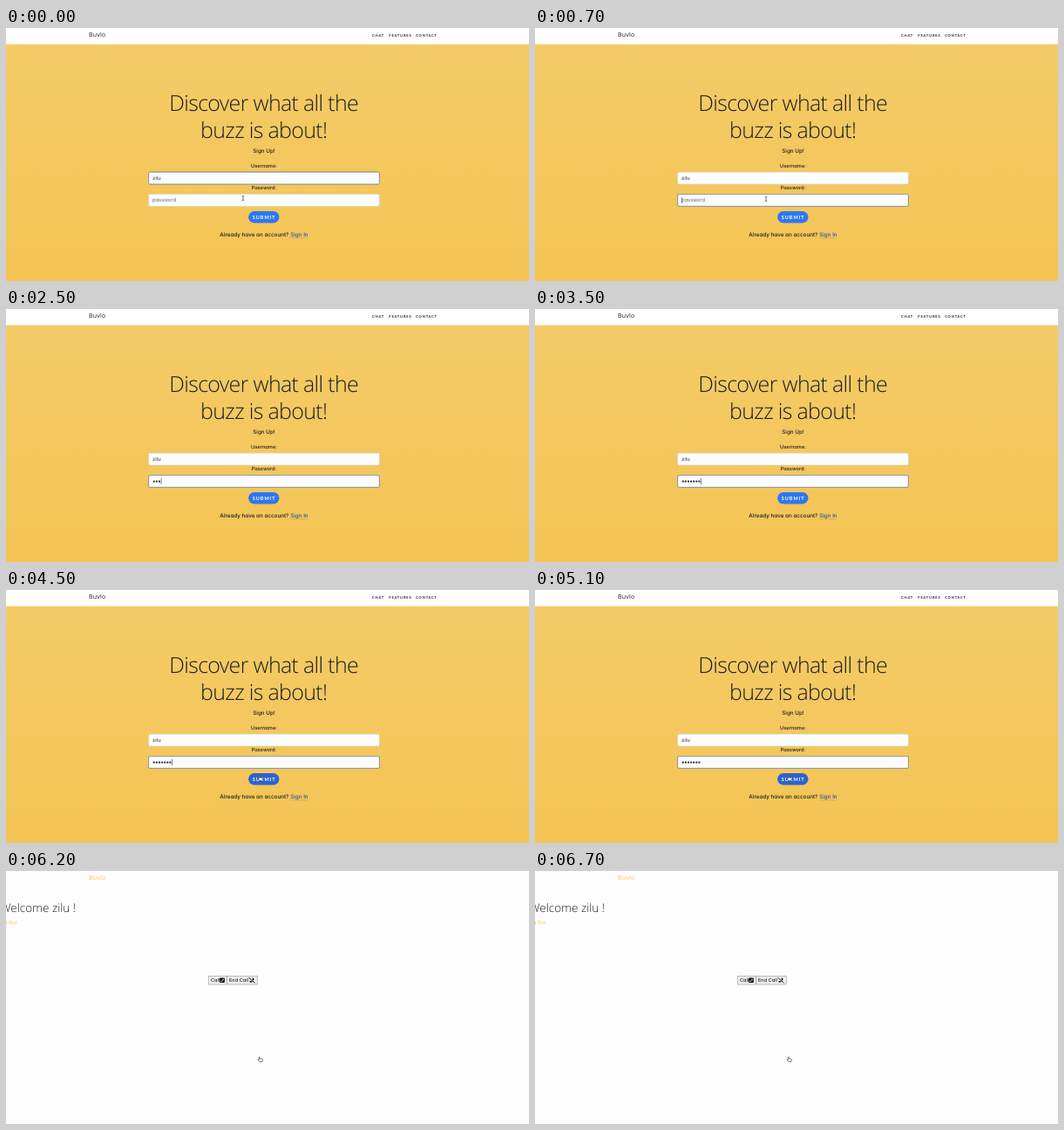
These frames come from a looping animation (600x290 px, 8000 ms). An HTML page:

```html
<!DOCTYPE html>
<html lang="en">
<head>
<meta charset="utf-8">
<title>Sign up</title>
<style>
  html, body { margin: 0; width: 100%; height: 100%; overflow: hidden; background: #fff; }
  svg { display: block; width: 100vw; height: 100vh; }
  text { font: 500 6.3px Inter, sans-serif; font-feature-settings: "cv11"; fill: #1b1e22; text-rendering: geometricPrecision; }
  .mid { text-anchor: middle; }
  .end { text-anchor: end; }
  .title { font: 300 25px "Open Sans", sans-serif; letter-spacing: -.68px; }
  .brand { font: 400 7px "Open Sans", sans-serif; letter-spacing: .25px; }
  .nav { font: 700 4.1px Lato, sans-serif; letter-spacing: .78px; }
  .label { font-size: 5.7px; }
  .hint { font-weight: 400; font-size: 5.8px; fill: #5f676f; }
  .value { font-size: 5.8px; fill: #495057; }
  .cta { font: 700 5.6px Lato, sans-serif; letter-spacing: .95px; fill: #fff; }
  .link { fill: #2a4fb4; }
  .hello { font: 300 13.5px "Open Sans", sans-serif; }
  .gold { fill: #f2c75f; }
  .small { font-weight: 400; font-size: 5.6px; }
  .tool { fill: #000; }
  .field { fill: #fcfdff; stroke: #ced4da; stroke-width: .5; }
  .focus { stroke: #8d949e; stroke-width: .8; filter: drop-shadow(0 0 .7px #5a6a8a); }
  .key { fill: #efefef; stroke: #858585; stroke-width: .5; }
</style>
</head>
<body>
<svg viewBox="0 0 600 290" preserveAspectRatio="none">
  <defs>
    <linearGradient id="honey" x1="0" y1="0" x2="0" y2="1">
      <stop offset="0" stop-color="#f4cb67"/>
      <stop offset="1" stop-color="#f4c454"/>
    </linearGradient>
    <path id="handset" d="M-2.1-1.7l1.1-.5 .6 1.3-.6.5q.4.9 1.3 1.3l.5-.6 1.3.6-.5 1.1q-3.4 0-3.7-3.7z"/>
  </defs>

  <g id="form">
    <rect width="600" height="290" fill="#fff"/>
    <rect y="18.6" width="600" height="271.4" fill="url(#honey)"/>
    <text class="brand" x="95" y="10.2">Buvlo</text>
    <text class="nav" x="420" y="9.8">CHAT</text>
    <text class="nav" x="439.3" y="9.8">FEATURES</text>
    <text class="nav" x="470.2" y="9.8">CONTACT</text>
    <text class="title mid" x="295.7" y="95.2">Discover what all the</text>
    <text class="title mid" x="295.7" y="125.6">buzz is about!</text>
    <text class="mid" x="296" y="143.3">Sign Up!</text>
    <text class="label mid" x="296" y="159.5">Username:</text>
    <rect id="user" class="field" x="163.7" y="165.2" width="264.6" height="13.7" rx="1.6"/>
    <text class="value" x="168" y="174.1">zilu</text>
    <text class="label mid" x="296" y="185.1">Password:</text>
    <rect id="pass" class="field" x="163.7" y="190.6" width="264.6" height="13.7" rx="1.6"/>
    <text id="hint" class="hint" x="168" y="199.3">password</text>
    <g id="dots" fill="#30353b"></g>
    <rect id="caret" y="194" width=".6" height="7" fill="#30353b"/>
    <rect id="ring" x="277.5" y="209.2" width="36.8" height="15" rx="7.5" fill="#9aabc4"/>
    <rect id="button" x="278.1" y="209.9" width="35.4" height="13.6" rx="6.8"/>
    <text class="cta mid" x="296.1" y="218.7">SUBMIT</text>
    <text class="mid" x="296" y="239.4">Already have an account? <tspan class="link">Sign In</tspan></text>
    <path d="M325.5 240.8h20.5" stroke="#2a4fb4" stroke-width=".5" opacity=".35"/>
  </g>

  <g id="home">
    <rect width="600" height="290" fill="#fefdfe"/>
    <text class="brand gold" x="95" y="10.2">Buvlo</text>
    <text class="hello end" x="80" y="47.2">Welcome zilu !</text>
    <text class="small gold end" x="12.5" y="61.3">Log Out</text>
    <rect class="key" x="232.7" y="120.4" width="20.8" height="9.6"/>
    <rect class="key" x="253.6" y="120.4" width="34.6" height="9.6"/>
    <text class="small tool" x="235" y="127.2">Call</text>
    <text class="small tool" x="256" y="127.2">End Call</text>
    <rect x="245.2" y="122.4" width="5.6" height="5.6" rx=".8"/>
    <use href="#handset" fill="#fff" transform="translate(248 125.2) rotate(-90) scale(.85)"/>
    <use href="#handset" transform="translate(282 125.2) rotate(-90) scale(1.25)"/>
    <path d="M278.4 122.2l7.2 6" stroke="#efefef" stroke-width="1.6"/>
    <path d="M278.4 122.2l7.2 6" stroke="#000" stroke-width=".9"/>
  </g>

  <g id="cursor">
    <path id="beam" d="M-1.3-2.6q1.3 0 1.3.7 0-.7 1.3-.7M0-2V2M-1.3 2.6q1.3 0 1.3-.7 0 .7 1.3.7" fill="none" stroke="#333" stroke-width=".65"/>
    <path id="arrow" d="M0-2.5v5.8l1.4-1.3.9 2 .9-.4-.9-1.9h1.9z" fill="#111" stroke="#fff" stroke-width=".4"/>
    <path id="hand" d="M-1.2-2.6q.6-.5 1 .2l.4 1.5 2.2.4q.7.3.5 1.2l-.5 1.9H-.6L-2.3.6q-.3-.8.5-.7l.8.4z" fill="#fff" stroke="#222" stroke-width=".6" stroke-linejoin="round"/>
  </g>
</svg>
<script>
const LOOP = 8000, STEP = 100;
const FOCUS = 500, SUBMIT = 5900, HOME = 6200;
const KEYS = [2000, 2200, 2500, 2700, 2900, 3200, 3500];
const HIDE = 1900, SHOW = 4000;
const PATH = [[0, 272, 195], [100, 272, 195], [500, 265, 196], [4000, 265, 196], [4400, 291.5, 216], [LOOP, 291.5, 216]];
const DOT = 3.1;

const $ = id => document.getElementById(id);
const show = (id, on) => $(id).setAttribute("display", on ? "inline" : "none");

const dots = KEYS.map((_, i) => {
  const c = document.createElementNS("http://www.w3.org/2000/svg", "circle");
  c.setAttribute("cx", 169.8 + i * DOT);
  c.setAttribute("cy", 197.7);
  c.setAttribute("r", 1.15);
  return $("dots").appendChild(c);
});

function pointer(t) {
  const i = PATH.findIndex(p => p[0] > t);
  const [t0, x0, y0] = PATH[i - 1], [t1, x1, y1] = PATH[i];
  const k = (t - t0) / (t1 - t0), e = k * k * (3 - 2 * k);
  return [x0 + (x1 - x0) * e, y0 + (y1 - y0) * e];
}

function draw(t) {
  const home = t >= HOME, typing = t >= FOCUS && t < SUBMIT;
  show("form", !home);
  show("home", home);

  const typed = KEYS.filter(k => k <= t).length;
  dots.forEach((d, i) => d.setAttribute("display", i < typed ? "inline" : "none"));
  show("hint", !typed);
  $("user").classList.toggle("focus", t < FOCUS);
  $("pass").classList.toggle("focus", typing);

  const since = t - (typed ? KEYS[typed - 1] : FOCUS);
  show("caret", typing && Math.floor(since / 500) % 2 === 0);
  $("caret").setAttribute("x", typed ? 168.5 + typed * DOT : 168.2);

  const [x, y] = pointer(t);
  const over = y > 210;
  $("button").setAttribute("fill", over ? "#2a64d0" : "#2f76f4");
  show("ring", t >= SUBMIT);
  $("cursor").setAttribute("transform", `translate(${x} ${y})`);
  show("cursor", t < HIDE || t >= SHOW);
  show("beam", y < 204.5);
  show("arrow", y >= 204.5 && !over);
  show("hand", over);
}

function tick() {
  draw(Math.floor(performance.now() % LOOP / STEP) * STEP);
  requestAnimationFrame(tick);
}
tick();
</script>
</body>
</html>
```
